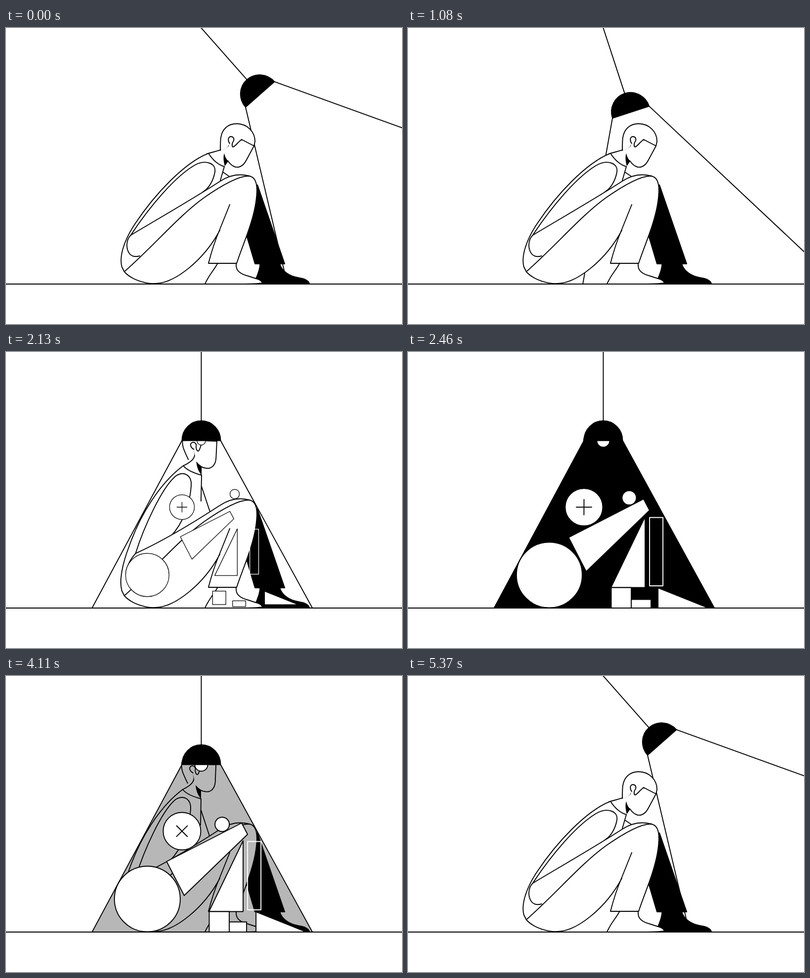
These frames come from a looping animation (800 by 600 pixels, 5400 ms). An HTML page:

```html
<!DOCTYPE html>
<html lang="en">
<head>
<meta charset="utf-8">
<title>Under the lamp</title>
<style>
  html, body { margin: 0; width: 100%; height: 100%; overflow: hidden; background: #fff; }
  svg { display: block; width: 100vw; height: 100vh; }
  .ink { fill: none; stroke: #000; stroke-width: 1.9; stroke-linejoin: round; stroke-linecap: round; }
  .paper { fill: #fff; }
  .black { fill: #000; }
  .bare { stroke: none; }
  #machine > * { transform-box: fill-box; transform-origin: center; }
</style>
</head>
<body>
<svg viewBox="0 0 800 600" class="ink">
  <path id="beam"/>

  <g id="figure">
    <path class="black" d="M508 318L563 478H503L487 424C497 395 508 350 508 318Z"/>
    <path class="black" d="M513 478H553C558 494 573 503 590 506C604 508 612 513 613 519H502C504 506 514 492 513 478Z"/>
    <path id="foot" class="paper"/>
    <path id="torso" class="paper bare"/>
    <path id="back"/>
    <path id="chest"/>
    <path id="arm" class="paper"/>
    <path id="forearm" class="paper bare"/>
    <path id="elbow"/>
    <path class="paper bare" d="M239 494C300 440 350 380 400 344C440 315 470 298 492 300C510 306 508 330 505 352C500 395 478 440 466 477H409C420 455 424 430 432 410C400 470 342 517 302 518C285 519 255 512 239 494Z"/>
    <path d="M432 410C400 470 342 517 302 518C285 519 255 512 239 494C300 440 350 380 400 344C440 316 470 300 490 300C510 302 508 330 505 352C499 395 478 440 466 477H409C416 450 426 422 432 408L452 358"/>
    <path id="neck" class="paper bare"/>
    <path id="nape"/>
    <path id="collar"/>
    <g id="head">
      <path class="paper bare" d="M433 248C433 240 434 230 434 222C437 204 449 194 466 194C488 194 503 211 503 230L501 239L486 267C480 279 472 283 464 282C456 280 451 274 445 265L451 234C449 243 442 246 433 248Z"/>
      <path d="M433 248C433 240 433 230 434 222C437 204 449 194 466 194C488 194 503 211 503 230L501 239L486 267C480 279 472 283 464 282C457 280 452 275 448 269"/>
      <path d="M452 234C448 229 448 221 454 220C460 220 462 226 459 230C456 234 456 241 459 241C463 240 468 232 476 226L501 239"/>
    </g>
    <path id="shade" class="black bare"/>
  </g>

  <path id="cone" class="black bare"/>

  <g id="machine">
    <circle class="paper" cx="394.5" cy="180" r="13"/>
    <circle class="paper" cx="285.5" cy="452" r="66.5"/>
    <g>
      <circle class="paper" cx="355.5" cy="314.5" r="38"/>
      <path id="cross" d="M340 314.5H371M355.5 299V330"/>
    </g>
    <path class="paper" d="M324.5 376L476 298L488 321L360 445Z"/>
    <circle id="ball" class="paper" r="14.5"/>
    <path class="paper" d="M479 334V477.5H410Z"/>
    <rect class="paper" x="410.5" y="477.5" width="40.5" height="41.5"/>
    <rect id="block" class="paper" x="451"/>
    <path class="paper" d="M505 478V519H607Z"/>
    <rect x="488" y="335.5" width="27" height="138.5" stroke="#fff"/>
  </g>
  <path id="spring" d="M329 444C333 435 338 431 343 434C348 438 350 448 352 455" pathLength="1"/>

  <path d="M0 519H800"/>
  <g id="lamp">
    <path d="M394.5 -5V140"/>
    <path class="black" d="M355.5 179.5A39 40 0 0 1 433.5 179.5Z"/>
  </g>
</svg>
<script>
const LOOP = 5400, PIVOT = 394.5, FLOOR = 519, SWING = 41.4, SPREAD = 28.4, TILT = 0.25;
const el = id => document.getElementById(id);
const set = (id, attrs) => { for (const k in attrs) el(id).setAttribute(k, attrs[k]); };
const clamp = x => Math.min(1, Math.max(0, x));
const ramp = (t, from, to) => clamp((t - from) / (to - from));
const ease = x => (1 - Math.cos(Math.PI * x)) / 2;
const glide = (t, from, to) => ease(ramp(t, from, to));
const lerp = (a, b, k) => a + (b - a) * k;

// Eased value through [time, value] keys
function track(t, keys, curve = ease) {
  let i = 0;
  while (i < keys.length - 2 && t > keys[i + 1][0]) i++;
  const [a, b] = [keys[i], keys[i + 1]];
  return lerp(a[1], b[1], curve(ramp(t, a[0], b[0])));
}

// Blend two paths that share the same commands
function morph(a, b, k) {
  const target = b.match(/[\d.]+/g);
  let i = 0;
  return a.replace(/[\d.]+/g, n => lerp(+n, +target[i++], k).toFixed(2));
}

// [bowed, upright]
const poses = {
  torso: ["M409 254C360 273 300 338 262 395C240 427 228 462 234 484L239 494L400 400L450 300L441 281Z",
          "M357 230C310 265 270 330 248 395C236 427 228 462 234 484L239 494L400 400L411 325L394 249Z"],
  back: ["M409 254C360 273 300 338 262 395C240 427 228 462 234 484L239 494",
         "M357 230C310 265 270 330 248 395C236 427 228 462 234 484L239 494"],
  chest: ["M441 281L433 309M438 292L450 300",
          "M394 249L393 302M394 272L411 324"],
  arm: ["M252 420C288 365 343 298 385 276C405 267 425 275 422 292C419 309 410 325 398 332",
        "M262 408C278 355 315 272 343 250C360 240 374 250 373 270C371 302 360 345 330 376"],
  forearm: ["M252 420C300 391 380 345 432 311C450 299 470 294 492 300L400 360L270 462C260 465 252 462 250 458C243 448 242 430 252 420Z",
            "M262 408C300 392 380 345 432 311C450 299 470 294 492 300L400 360L270 462C260 465 252 462 250 458C243 448 242 430 262 408Z"],
  elbow: ["M492 300C470 294 450 299 432 311C380 345 300 391 252 420C242 430 242 448 250 458C255 464 263 464 270 462",
          "M492 300C470 294 450 299 432 311C380 345 320 382 262 408C242 430 242 448 250 458C255 464 263 464 270 462"],
  neck: ["M451 232C449 243 440 246 409 254C418 268 428 277 441 281L455 265Z",
         "M376 195C384 210 378 220 357 230C365 240 380 245 394 249L395 225Z"],
  nape: ["M452 234C449 243 440 246 409 254", "M377 196C384 210 378 220 357 230"],
  collar: ["M409 254C418 268 428 277 441 281", "M357 230C365 240 380 245 394 249"],
  shade: ["M441 254C438 262 440 272 442 280L449 270C445 266 442 260 441 254Z",
          "M383 221C384 233 388 242 394 249L394 231C390 228 386 225 383 221Z"]
};
const footDown = "M427 478C418 494 409 502 402 519C425 519 450 519 470 519C490 519 505 519 518 517C516 509 503 508 490 503C470 498 464 490 465 478";
const footUp = "M427 478C418 494 409 502 402 519C425 519 450 518 470 514C492 508 506 500 516 491C510 493 500 495 490 495C470 497 460 493 465 478";

function drawLight(angle, darkness) {
  const ray = side => {
    const a = angle * Math.PI / 180, b = (angle + TILT + side * SPREAD) * Math.PI / 180;
    const x = PIVOT + 179.5 * Math.sin(a) + side * 39 * Math.cos(a);
    const y = 179.5 * Math.cos(a) - side * 39 * Math.sin(a);
    return [[x, y], [x + (FLOOR - y) * Math.tan(b), FLOOR]];
  };
  const [left, right] = [ray(-1), ray(1)];
  set("beam", { d: `M${left.join("L")}M${right.join("L")}` });
  set("cone", { d: `M${left.join("L")}L${right.reverse().join("L")}Z`, opacity: darkness });
  set("lamp", { transform: `rotate(${-angle} ${PIVOT} 0)` });
}

function drawFigure(t) {
  const rise = glide(t, 1680, 2180) * (1 - glide(t, 4280, 4950));
  for (const id in poses) set(id, { d: morph(...poses[id], rise) });
  set("head", { transform: `translate(${-74 * rise} ${-45 * rise}) rotate(${-26 * rise} 468 238)` });
  const tap = glide(t, 1380, 1560) * (1 - glide(t, 1620, 1800));
  set("foot", { d: morph(footDown, footUp, tap) });
}

function drawMachine(t) {
  const size = glide(t, 1980, 2230) * (1 - glide(t, 4150, 4400));
  el("machine").style.display = size ? "" : "none";
  for (const part of el("machine").children) part.style.transform = `scale(${size})`;

  const spin = track(t, [[2460, 0], [3510, 246.6], [4110, 405], [4400, 480]], x => x);
  set("cross", { transform: `rotate(${spin} 355.5 314.5)` });

  const x = track(t, [[2280, 462], [2780, 410], [3150, 456], [3540, 411], [4300, 441]]);
  set("ball", { cx: x, cy: 295 + (448 - x) * 0.505 });

  const width = track(t, [[2460, 40], [2850, 22], [3180, 40], [3510, 22], [4110, 35]]);
  const height = 17.5 + (40 - width) * 0.6;
  set("block", { width, height, y: FLOOR - height });

  const head = ramp(t, 3330, 3480), tail = ramp(t, 3540, 3690);
  el("spring").style.display = head > tail ? "" : "none";
  set("spring", { "stroke-dasharray": `${head - tail} 2`, "stroke-dashoffset": -tail });
}

function draw(t) {
  const angle = SWING * (1 - glide(t, 75, 1935) + glide(t, 4250, 5350));
  const darkness = ramp(t, 2180, 2390) * (1 - ramp(t, 3960, 4170));
  drawLight(angle, darkness);
  drawFigure(t);
  drawMachine(t);
}

const start = performance.now();
function tick() {
  draw((performance.now() - start) % LOOP);
  requestAnimationFrame(tick);
}
tick();
</script>
</body>
</html>
```
